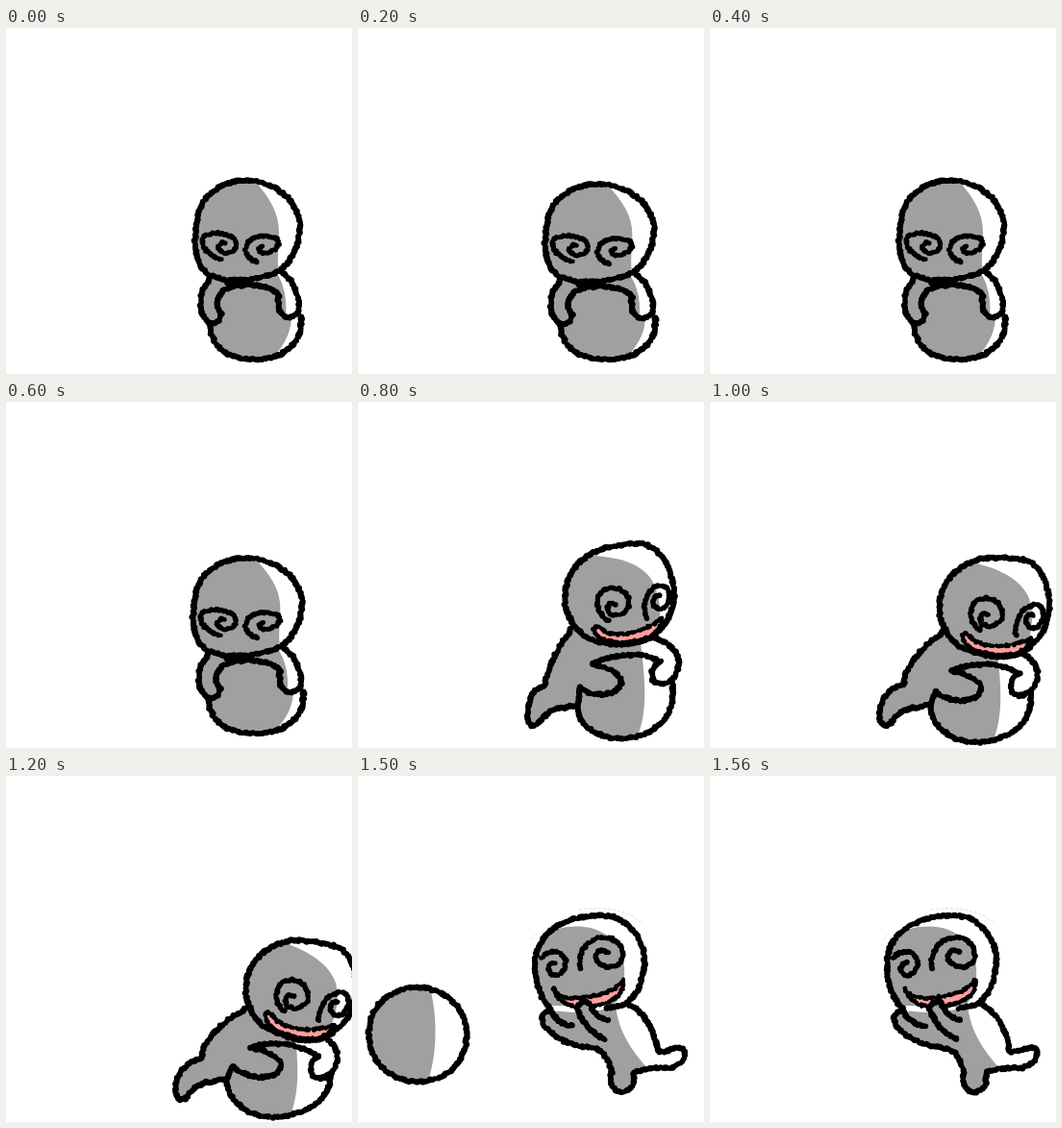
An HTML page with a canvas that plays this animation: 360 px wide and 360 px high, repeating every 2.06 s.

```html
<!DOCTYPE html>
<html lang="en">
<head>
<meta charset="utf-8">
<title>Ghost throw</title>
<style>
  html, body { margin: 0; width: 100%; height: 100%; overflow: hidden; background: #fff; }
  canvas { display: block; width: 360px; height: 360px; }
</style>
</head>
<body>
<canvas id="stage" width="360" height="360"></canvas>
<script>
const SIZE = 360, LOOP = 2060;
const GREY = '#a0a0a0', PINK = '#ff9f9f', INK = '#000';
const tracer = document.createElementNS('http://www.w3.org/2000/svg', 'path');
let seed = 1;

function rnd() {
  seed = (seed * 16807) % 2147483647;
  return seed / 2147483647;
}

// Crayon line: overlapping dabs with slight jitter
function ink(c, d, r = 2.9) {
  c.fillStyle = INK;
  for (const part of d.split(/(?=M)/)) {
    tracer.setAttribute('d', part);
    const len = tracer.getTotalLength();
    for (let s = 0; s <= len; s += 1.7) {
      const p = tracer.getPointAtLength(s);
      c.beginPath();
      c.arc(p.x + rnd() * 1.8 - .9, p.y + rnd() * 1.8 - .9, r + rnd() * .8 - .4, 0, 7);
      c.fill();
    }
  }
}

function fill(c, d, color) {
  c.fillStyle = color;
  c.fill(new Path2D(d));
}

// White shape with its shaded part
function solid(c, d, shade) {
  fill(c, d, '#fff');
  c.save();
  c.clip(new Path2D(d));
  fill(c, shade, GREY);
  c.restore();
}

function sit(c, sx = 1, sy = 1) {
  c.translate(250, 347);
  c.scale(sx, sy);
  c.translate(-250, -347);
  const body = 'M213 260C200 274 200 296 212 306C212 330 228 345 258 346C290 346 308 330 308 306C306 295 306 274 288 253Z';
  solid(c, body, 'M190 250H278C288 262 293 280 291 300L297 302C296 322 286 334 272 350H190Z');
  ink(c, 'M213 260C201 272 199 294 208 304C216 310 224 306 224 297C217 290 218 280 228 272C244 264 276 266 284 279C281 291 286 301 295 301C311 300 306 270 288 254');
  ink(c, 'M212 306C212 330 228 345 258 345C290 345 309 328 307 300M231 266L246 266');
  const head = 'M250 159C278 158 307 181 306 208C304 234 291 253 272 258C246 264 216 266 204 250C195 238 196 216 199 198C204 174 222 159 250 159Z';
  solid(c, head, 'M190 150H250C272 172 284 190 284 212C284 235 279 250 290 266H190Z');
  ink(c, head);
  ink(c, 'M224 241C212 238 200 226 206 217C214 211 236 212 240 224C241 234 227 237 222 231C219 226 223 222 228 224', 2.5);
  ink(c, 'M260 243C248 239 247 228 253 221C261 215 281 214 284 223C283 232 270 236 264 233C261 229 264 227 268 228', 2.5);
}

function leanHead(c, x, y, deg) {
  c.save();
  c.translate(x, y);
  c.rotate(deg * Math.PI / 180);
  c.translate(-271, -200);
  const head = 'M262 151C274 148 286 147 296 147C306 149 313 157 319 165C328 179 330 198 328 212C322 230 314 241 303 246C285 254 258 253 244 248C224 238 215 220 215 204C216 176 236 155 262 151Z';
  solid(c, head, 'M205 160H243C275 161 295 170 305 184C314 200 318 220 309 255H205Z');
  const mouth = 'M245 236C248 232 252 234 257 239C276 246 300 238 316 225C315 236 309 243 300 246C280 252 250 254 245 236Z';
  fill(c, mouth, PINK);
  ink(c, head);
  ink(c, mouth, 2.2);
  ink(c, 'M262 228C248 222 246 206 253 198C262 190 278 193 282 206C284 218 270 226 262 220C257 213 261 208 267 210', 2.6);
  ink(c, 'M300 226C295 213 300 194 313 191C324 189 327 203 321 212C314 219 306 214 307 206C308 202 311 201 314 202', 2.6);
  c.restore();
}

// back: shoulder and hip, ball: ball shift, arm and hand: arm shifts
function lean(c, { back, ball: [bx, by], arm: [ax, ay], hand: [hx, hy], head }) {
  const [sx, sy, mx, my] = back;
  const L = (x, y) => `${x + ax} ${y + ay} `;
  const R = (x, y) => `${x + hx} ${y + hy} `;
  const B = (x, y) => `${x + bx} ${y + by} `;
  const spine = `M${sx} ${sy}C${mx + 5} ${my - 28} ${mx} ${my - 12} ${mx} ${my}C${mx - 16} ${my + 3} 179 308 177 320C175 332 178 340 187 335C194 326 200 319 214 318L229 315`;
  const round = `C${B(225, 330)}${B(242, 348)}${B(270, 350)}C${B(302, 351)}${B(333, 334)}${R(327, 290)}`;
  solid(c, `${spine}${round}L${R(310, 246)}Z`,
    `M160 220H${290 + bx}C${B(298, 280)}${B(305, 322)}${B(287, 356)}H160Z`);
  ink(c, spine);
  ink(c, `M${B(231, 297)}L229 315${round}`);
  ink(c, `M${B(231, 297)}C${L(240, 306)}${L(264, 307)}${L(272, 297)}C${L(280, 286)}${L(262, 276)}${L(243, 273)}C${L(262, 264)}${R(292, 258)}${R(312, 269)}`);
  const grip = `M${R(309, 246)}C${R(326, 250)}${R(337, 264)}${R(333, 277)}C${R(330, 292)}${R(313, 298)}${R(307, 289)}C${R(303, 280)}${R(309, 272)}${R(316, 270)}`;
  fill(c, grip, '#fff');
  ink(c, grip);
  leanHead(c, ...head);
}

function thrown(c, ball) {
  if (ball) {
    const d = 'M11 268C12 238 34 220 62 220C92 221 113 242 113 270C112 300 90 318 62 318C32 317 12 298 11 268Z';
    solid(c, d, 'M0 210H72C82 240 86 290 68 330H0Z');
    ink(c, d);
  }
  const body = 'M280 237C300 246 308 264 312 287C326 288 333 278 340 286C342 297 330 305 317 304C306 303 298 306 287 308C289 320 284 329 275 329C264 328 261 318 264 308C262 300 260 295 255 289C248 281 238 283 226 280C208 274 192 264 191 252C192 246 198 243 202 246';
  solid(c, body + 'L250 235Z', 'M180 225H268C266 255 279 280 303 306L290 335H180Z');
  ink(c, body);
  const side = 'C196 238 193 232 190 226C183 211 183 196 186 183C191 163 213 149 240 146C252 144 264 145 272 149C290 160 298 176 298 192C297 211 292 226 280 236';
  const head = `M200 242${side}C262 244 220 250 200 242Z`;
  solid(c, head, 'M180 168L196 164C210 155 240 153 256 164C270 171 276 180 277 200C278 220 274 232 264 239H180Z');
  const mouth = 'M203 221C209 236 238 231 256 226C266 223 272 218 276 212C278 222 271 231 260 235C242 243 212 246 203 221Z';
  fill(c, mouth, PINK);
  ink(c, `M200 242${side}C274 239 266 241 258 242`);
  ink(c, mouth, 2.2);
  ink(c, 'M191 189C197 180 212 180 216 192C217 203 208 211 201 206C196 200 199 194 205 194', 2.6);
  ink(c, 'M231 200C228 182 240 168 256 168C270 168 277 180 275 190C271 202 254 201 248 191C246 182 255 179 261 184', 2.6);
  fill(c, 'M229 245C226 238 235 232 241 237C245 246 251 253 263 254L257 274C244 268 234 258 229 245Z', GREY);
  ink(c, 'M257 274C244 268 234 258 229 245C226 238 235 232 241 237C245 246 251 253 262 254M202 246C208 256 214 260 225 260');
  c.strokeStyle = '#ddd';
  c.lineWidth = 1;
  c.setLineDash([3, 2]);
  c.stroke(new Path2D('M181 170L187 163M230 139C252 136 278 137 297 154'));
}

function pose(draw) {
  const layer = document.createElement('canvas');
  layer.width = layer.height = SIZE;
  const c = layer.getContext('2d');
  seed = 77;
  c.fillStyle = '#fff';
  c.fillRect(0, 0, SIZE, SIZE);
  draw(c);
  return layer;
}

const rest = pose(c => sit(c));
const squash = pose(c => sit(c, 1.04, .98));
const steps = [
  [0, rest], [200, squash], [400, rest], [600, squash],
  [800, pose(c => lean(c, { back: [222, 236, 195, 296], ball: [0, 0], arm: [0, 0], hand: [0, 0], head: [271, 200, 0] }))],
  [1000, pose(c => lean(c, { back: [243, 239, 202, 294], ball: [4, 4], arm: [8, 7], hand: [7, 12], head: [295, 212, 11] }))],
  [1200, pose(c => lean(c, { back: [250, 242, 204, 294], ball: [5, 5], arm: [12, 10], hand: [11, 21], head: [306, 221, 18] }))],
  [1500, pose(c => thrown(c, true))],
  [1560, pose(c => thrown(c, false))]
];

const stage = document.getElementById('stage').getContext('2d');
const start = performance.now();

function tick() {
  const t = (performance.now() - start) % LOOP;
  const [, layer] = steps.filter(([at]) => at <= t).pop();
  stage.drawImage(layer, 0, 0);
  requestAnimationFrame(tick);
}
tick();
</script>
</body>
</html>
```
